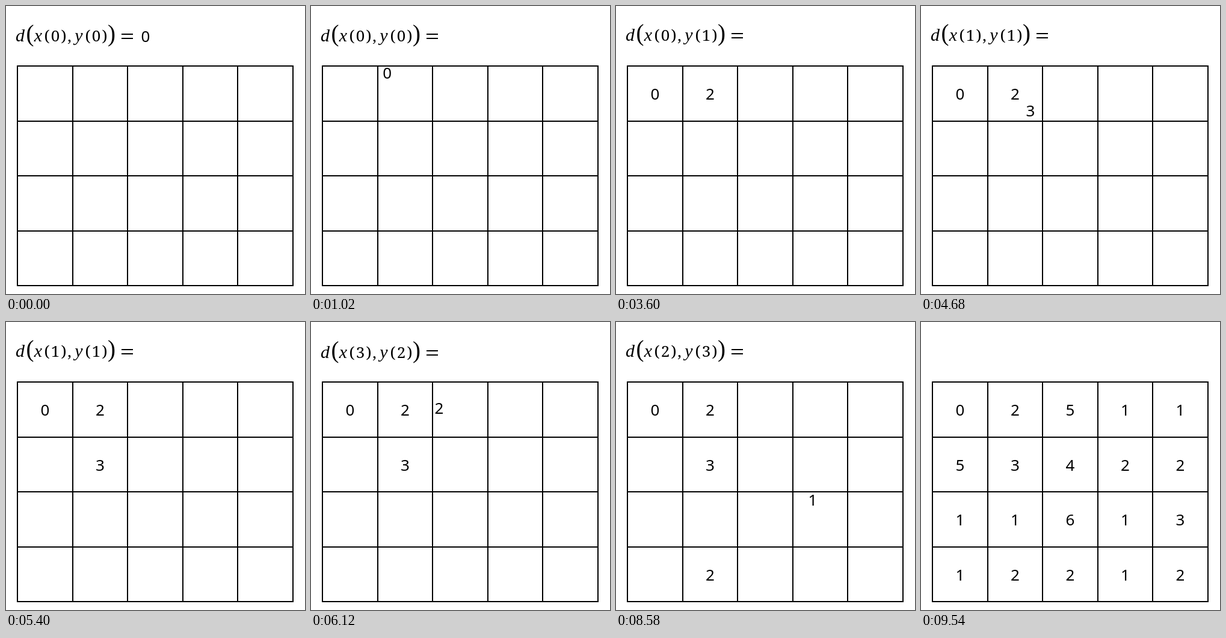
An HTML page with a canvas that plays this animation: 497 px wide and 480 px high, repeating every 9600 ms.

```html
<!DOCTYPE html>
<html lang="en">
<head>
<meta charset="utf-8">
<title>Distance matrix</title>
<style>
  html, body { margin: 0; height: 100%; overflow: hidden; background: #fff; }
  canvas { display: block; }
</style>
</head>
<body>
<canvas id="stage" width="497" height="480"></canvas>
<script>
const ctx = document.getElementById('stage').getContext('2d');
const LOOP = 9600, SLIDE = 1815, DELAY = 110, MOVE = 1597;
const START = { x: 232, y: 51 };
const DIGIT = '26px "Noto Sans", sans-serif';
const ROMAN = '26px "Noto Serif", serif';
const ITALIC = 'italic 30px "Liberation Serif", serif';
const TALL = '39px "Liberation Serif", serif';

// x and y are the indices in the formula; y0 is its vertical centre
const steps = [
  { x: 0, y: 0, y0: 50, value: 0, col: 0, row: 0 },
  { x: 0, y: 1, y0: 49, value: 2, col: 1, row: 0 },
  { x: 1, y: 1, y0: 49, value: 3, col: 1, row: 1 },
  { x: 3, y: 2, y0: 51, value: 2, col: 1, row: 3 },
  { x: 2, y: 3, y0: 49, value: 1, col: 3, row: 2 }
];
const matrix = ['02511', '53422', '11613', '12212'];

const cell = (col, row) => ({ x: 65 + 91.5 * col, y: 146.7 + 91.5 * row });
const ease = u => u < 0.5 ? 2 * u * u : 1 - 2 * (1 - u) ** 2;

function text(str, x, baseline, font) {
  ctx.font = font;
  ctx.fillText(str, x, baseline);
}

function digit(value, { x, y }) {
  text(value, x, y + 9.3, DIGIT);
}

function drawGrid() {
  for (let i = 0; i < 6; i++) ctx.fillRect(Math.round(18 + 91.6 * i), 99, 2, 368);
  for (let j = 0; j < 5; j++) ctx.fillRect(18, Math.round(99 + 91.5 * j), 460, 2);
}

function drawFormula({ x, y, y0 }) {
  const base = y0 + 9;
  text('d', 23.5, base, ITALIC);
  text('x', 53.5, base, ITALIC);
  text('y', 121, base, ITALIC);
  text('(', 40, y0 + 9, TALL);
  text(')', 175.5, y0 + 9, TALL);
  text(',', 105.5, base, ROMAN);
  for (const [index, centre] of [[x, 82], [y, 150]]) {
    text('(', centre - 14, base, ROMAN);
    text(index, centre, base, ROMAN);
    text(')', centre + 14, base, ROMAN);
  }
  ctx.fillRect(192, y0 - 4, 19, 2);
  ctx.fillRect(192, y0 + 3, 19, 2);
}

function drawStep(current, t) {
  const step = steps[current];
  drawFormula(step);
  for (const done of steps.slice(0, current)) digit(done.value, cell(done.col, done.row));
  const u = (t - current * SLIDE - DELAY) / MOVE;
  const p = ease(Math.min(1, Math.max(0, u)));
  const end = cell(step.col, step.row);
  digit(step.value, {
    x: START.x + (end.x - START.x) * p,
    y: START.y + (end.y - START.y) * p
  });
}

function render(t) {
  ctx.fillStyle = '#fff';
  ctx.fillRect(0, 0, 497, 480);
  ctx.fillStyle = '#000';
  ctx.textAlign = 'center';
  drawGrid();
  const current = Math.floor(t / SLIDE);
  if (current < steps.length) drawStep(current, t);
  else matrix.forEach((line, row) => [...line].forEach((v, col) => digit(v, cell(col, row))));
}

function tick() {
  render(performance.now() % LOOP);
  requestAnimationFrame(tick);
}
tick();
</script>
</body>
</html>
```
